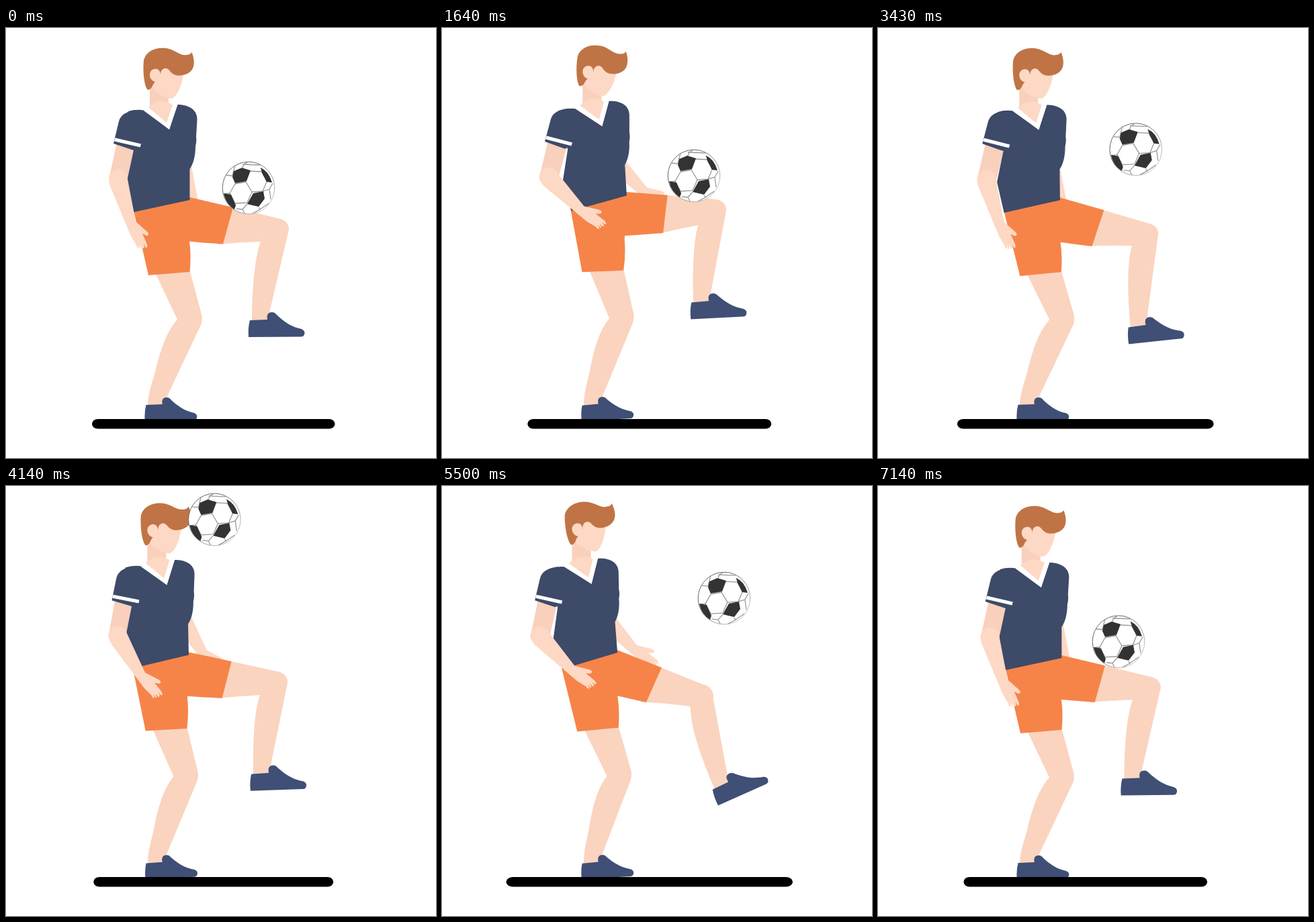
Write an HTML page that moves like this. It is 640 by 640 pixels and loops after 7210 ms.

```html
<!DOCTYPE html>
<html lang="en">
<head>
<meta charset="utf-8">
<title>Juggling a ball</title>
<style>
  html, body { margin: 0; width: 100%; height: 100%; overflow: hidden; background: #fff; }
  svg { display: block; width: 100%; height: 100%; }
  .skin { fill: #fad4bf; }
  .light { fill: #fdd8c4; }
  .shade { fill: #f8d0bb; }
  .navy { fill: #3d4a68; }
  .shoe { fill: #3f4f75; }
  .orange { fill: #f68449; }
  .hair { fill: #c07445; }
  .white { fill: #fff; }
</style>
</head>
<body>
<svg viewBox="0 0 640 640">
  <defs>
    <path id="lowerArm" class="light" d="M153 224A14 14 0 0 1 181 225L193 288L211 304Q214 309 209 309L203 306L210 322Q211 327 208 327L205 321L206 326Q204 330 203 327L201 322L201 328Q199 330 198 322L197.500 328Q195 329 194 323L186 310L154 233Z"/>
    <path id="shoe" class="shoe" d="M-15 1L11 0Q9 -11 18 -11Q22 -11 25 -7C38 5 48 11 62 14Q68 17 66 22Q65 25.500 61 25.500L-17 26Q-18 12 -15 1Z"/>
    <linearGradient id="rim" x2="1" y2="1">
      <stop offset=".3" stop-color="#666"/>
      <stop offset="1" stop-color="#ddd"/>
    </linearGradient>
  </defs>
  <g data-bone="farArm"><use href="#lowerArm" x="93" y="-30"/></g>
  <path data-bone="backShin" class="skin" d="M255 434C239 451 229 482 222 512C215 536 211 546 211 566L234 566L238 552L290 442Q295 430 286 419Z"/>
  <g data-bone="backShoe"><use href="#shoe" transform="translate(222.500 560) scale(.93)"/></g>
  <g data-bone="frontShin">
    <path class="skin" d="M379 318C370 342 366 390 366 440L388 440L391 428L421 300Q420 286 406 284L388 292Z"/>
    <use href="#shoe" x="378" y="434"/>
  </g>
  <g data-bone="thigh">
    <path class="skin" d="M325 264L408 284Q419 288 421 298L410 318L379 318Q345 319 315 322Z"/>
    <path class="orange" d="M248 246L338 267L323 321.500Q295 320 255 316Z"/>
  </g>
  <g data-bone="pelvis">
    <path class="skin" d="M220 360L272 355L291 426Q294 436 285 443L262 446L255 434Z"/>
    <path class="orange" d="M190 272L202 258L262 250L273 258V317Q276 340 273.500 363L212 368Z"/>
  </g>
  <path data-bone="arm" class="shade" d="M165 170L193 178L181.500 226L153 226Z"/>
  <rect data-bone="neck" class="shade" x="214" y="76" width="28" height="46"/>
  <g data-bone="torso">
    <path class="light" d="M211 119Q228 101 249 115L243 148Z"/>
    <path class="navy" d="M182 124Q195 120 207 123L243 151L255 114C271 114 285 121 284.500 136L283 162Q284 169 282 176C282 190 279 202 273.500 210V256L190 274L180 228L190 182L180 150Z"/>
    <path class="white" d="M205 123L243 151L255.500 114L248 114L239 141L212 118Z"/>
  </g>
  <g data-bone="arm">
    <path class="navy" d="M168 139C171 127 184 123 195 122L214 140L205 176L190 182L160 172Z"/>
    <path class="white" d="M162.500 163.500L201 172.500L199.700 177.500L161 168.500Z"/>
  </g>
  <use data-bone="forearm" href="#lowerArm"/>
  <g data-bone="head">
    <path class="light" d="M216 62L266 56Q264 80 257 93Q251 105 245 105Q229 102 217 89Z"/>
    <path class="hair" d="M211 92C207 89 203 70 205 48C208 35 222 28 238 30C252 32 259 42 269 40Q274 40 276.500 36C280 45 281 53 278 60C273 70 260 72 252 70C243 67 244 59 236 60Q230 62 230 69L219 84Q216 92 211 92Z"/>
    <path class="light" d="M230 69C229 63 226 60 221 61C215 62 213 68 214.500 73Q216 78 221 80L229 78Z"/>
  </g>
  <rect id="ground" y="582" height="14.500" ry="7.200"/>
  <g id="ball">
    <circle r="38.800" fill="#fff" stroke="url(#rim)"/>
    <path fill="none" stroke="#999" stroke-width="1.300" d="M-20-6L-4-9L5 6L-2 22L-20 23L-28 8ZM2-25L22-24L27-9L21 5L5 6M-9-30L-7-35L-2-38M-9-35L17-34M22-24L18-30M-24-18L-33-19M-24-18L-20-34M-28 8L-36 9M-20 23L-21 28M-2 24L-9 32L-18 31M-9 32L-6 38M15 29L17 32L6 38M17 32L30 23M21 5L31 2L36-7M31 2L33 17"/>
    <path fill="#333" d="M-22-25L-10-30L3-26L-3-10L-20-7L-24-16ZM7 8L22 5L24 16L15 28L-2 24ZM18-30Q30-25 35-8L27-9L20-22ZM-37 8L-26 10L-19 26L-21 32Q-34 24-37 8Z"/>
  </g>
</svg>
<script>
const LOOP = 7210, STEP = LOOP / 101;

// joint: where the bone hangs on its parent
// turn: degrees added by raising the arms, kicking and striking with the knee
// lift: how far raising the arms pulls the bone up
const bones = {
  backShoe:  { joint: [225, 560], turn: [-6, 3.5, 1] },
  backShin:  { joint: [225, 560], turn: [-7.5, 2, 2] },
  pelvis:    { parent: 'backShin', joint: [273, 433], turn: [4, -10.7, 0] },
  thigh:     { parent: 'pelvis', joint: [263.7, 279], turn: [-3, 32, -7], lift: 7 },
  frontShin: { parent: 'thigh', joint: [402, 302], turn: [-4.7, -62.5, 1] },
  torso:     { parent: 'pelvis', joint: [273.5, 256], turn: [-3.2, -7, -1.2], lift: 7 },
  neck:      { parent: 'torso', joint: [243, 151], turn: [0, 0, 0] },
  head:      { parent: 'neck', joint: [222, 70], turn: [-5, -5.5, 7] },
  arm:       { parent: 'torso', joint: [200, 128], turn: [-5.7, 10.5, 5] },
  forearm:   { parent: 'arm', joint: [166.5, 224.5], turn: [-40, 0, -2] },
  farArm:    { parent: 'arm', joint: [259.5, 194.5], turn: [-40, 0, -2] }
};

// Each touch of the ball, and the top of the flight that follows
const touches = [
  { t: 0, x: 361, y: 238, topX: 335, topY: 47 },
  { t: 1640, x: 375, y: 220, topX: 420, topY: 165 },
  { t: 2540, x: 497, y: 383, topX: 310, topY: 49 },
  { t: 5210, x: 377, y: 222, topX: 420, topY: 167 },
  { t: 6070, x: 499, y: 375, topX: 318, topY: 150 },
  { t: LOOP, x: 361, y: 238 }
];

const mix = (a, b, u) => a + (b - a) * u;

function ramp(t, from, to) {
  const u = Math.min(1, Math.max(0, (t - from) / (to - from)));
  return u * u * (3 - 2 * u);
}

const pulse = (t, from, full, hold, to) => ramp(t, from, full) - ramp(t, hold, to);

function weights(t) {
  return [
    .65 * pulse(t, 0, 1640, 1640, 2400) + pulse(t, 3660, 4860, 5090, 6150),
    pulse(t, 1600, 2400, 2400, 3660) + pulse(t, 5090, 6150, 6150, 7180),
    pulse(t, 700, 1640, 1640, 2400)
  ];
}

const blend = (amounts, w) => amounts.reduce((sum, a, i) => sum + a * w[i], 0);

function solve(w) {
  const pose = {};
  for (const [name, { parent, joint, turn, lift = 0 }] of Object.entries(bones)) {
    let [x, y] = joint;
    if (parent) {
      const p = pose[parent], a = p.angle * Math.PI / 180;
      const dx = x - bones[parent].joint[0], dy = y - bones[parent].joint[1];
      x = p.x + dx * Math.cos(a) - dy * Math.sin(a);
      y = p.y + dx * Math.sin(a) + dy * Math.cos(a);
    }
    pose[name] = { x, y: y - lift * w[0], angle: blend(turn, w) };
  }
  return pose;
}

// Rise and fall share the flight time as gravity would split it
function ballAt(t) {
  const i = touches.findLastIndex(p => p.t <= t), a = touches[i], b = touches[i + 1];
  const rise = Math.sqrt(a.y - a.topY), fall = Math.sqrt(b.y - a.topY);
  const top = mix(a.t, b.t, rise / (rise + fall));
  const up = ramp(t, a.t, top), down = ramp(t, top, b.t);
  return [
    mix(mix(a.x, a.topX, up), b.x, down),
    mix(mix(a.y, a.topY, up), b.y, down)
  ];
}

const parts = document.querySelectorAll('[data-bone]');
const ground = document.getElementById('ground');
const ball = document.getElementById('ball');

function draw(t) {
  const w = weights(t), pose = solve(w);
  for (const part of parts) {
    const name = part.dataset.bone, { x, y, angle } = pose[name], [jx, jy] = bones[name].joint;
    part.setAttribute('transform', `translate(${x} ${y}) rotate(${angle}) translate(${-jx} ${-jy})`);
  }

  const left = 128 + blend([6.5, -112, -4], w), width = 617.5 - 2 * left;
  ground.setAttribute('x', left);
  ground.setAttribute('width', width);
  ground.setAttribute('rx', width * .024);

  ball.setAttribute('transform', `translate(${ballAt(t)})`);
}

const start = performance.now();
function tick() {
  const t = (performance.now() - start) % LOOP;
  draw(Math.min(Math.floor((t + 4) / STEP), 100) * STEP);
  requestAnimationFrame(tick);
}
tick();
</script>
</body>
</html>
```
